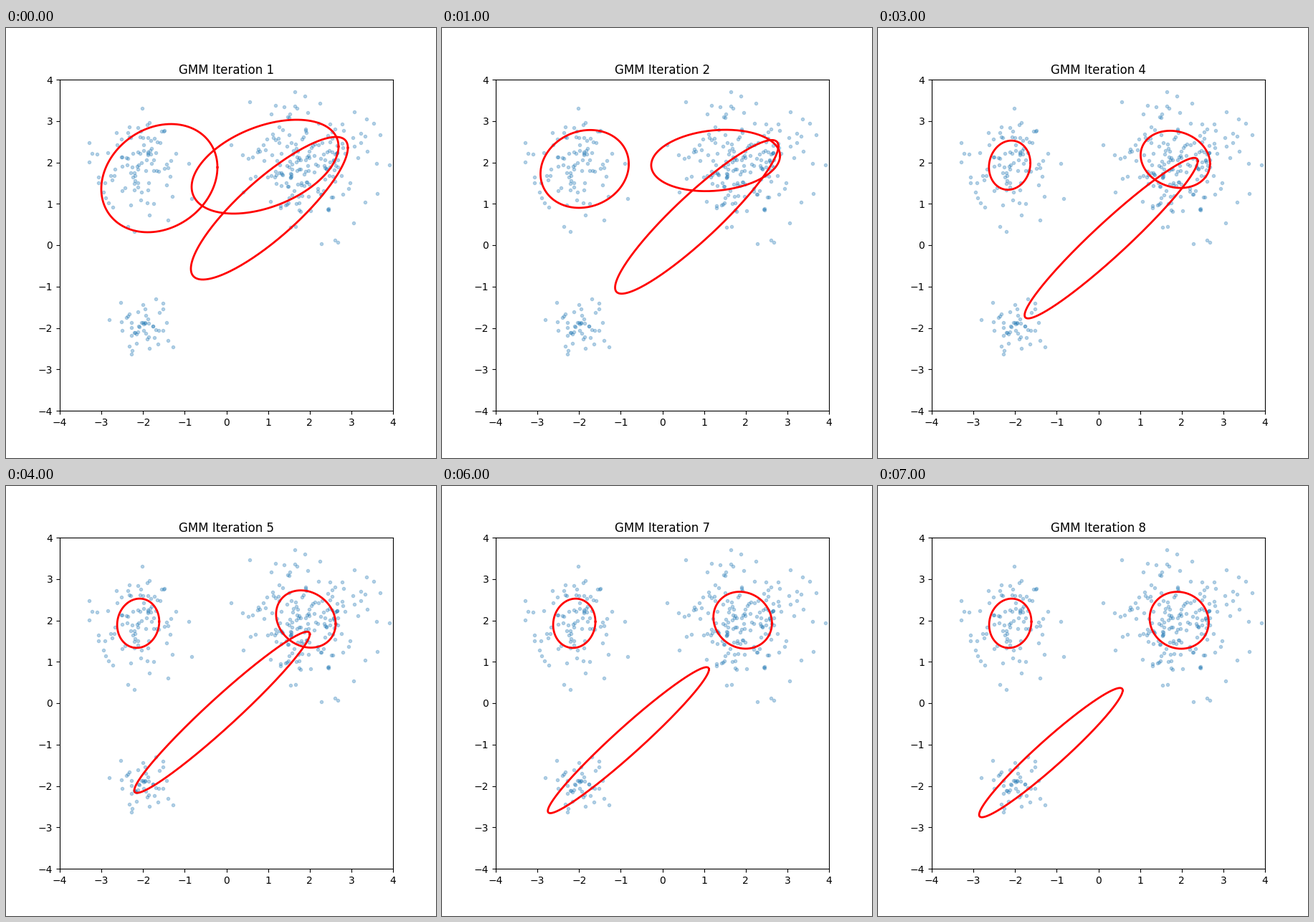
Animation, 600 px wide and 600 px high, one loop 8000 ms. Source, as a matplotlib script:

```python
import numpy as np
import matplotlib.pyplot as plt
from matplotlib.animation import FuncAnimation

STEPS = 8
LIMIT = 4

# Mixture after the first iteration: mean x, mean y, std x, std y, correlation.
START = [
    (-1.609, 1.619, 1.394, 1.307, 0.200),
    (0.929, 1.896, 1.763, 1.134, 0.430),
    (1.032, 0.892, 1.884, 1.723, 0.848),
]


def cluster(rng, mean, var, count):
    return np.array(mean) + np.sqrt(var) * rng.randn(count, 2)


def gaussian(mx, my, sx, sy, rho):
    cxy = rho * sx * sy
    return np.array([mx, my]), np.array([[sx ** 2, cxy], [cxy, sy ** 2]])


def moments(mean, cov):
    """Total mass, mean and scaled second moments as one vector."""
    second = (cov + np.outer(mean, mean)) / LIMIT
    return np.array([1, *mean, second[0, 0], second[0, 1], second[1, 1]])


def match_weights(data, parts):
    """Weights with which the mixture has the moments of the data."""
    columns = np.column_stack([moments(*part) for part in parts])
    total = moments(data.mean(axis=0), np.cov(data.T, bias=True))
    weights = np.linalg.lstsq(columns, total, rcond=None)[0]
    return weights / weights.sum()


def density(data, mean, cov):
    d = data - mean
    power = np.einsum("ni,ij,nj->n", d, np.linalg.inv(cov), d)
    return np.exp(-power / 2) / np.sqrt(np.linalg.det(cov))


def em_step(data, weights, parts):
    """One expectation-maximisation update of all components."""
    resp = np.array([w * density(data, *p) for w, p in zip(weights, parts)])
    resp /= resp.sum(axis=0)
    updated = []
    for r in resp:
        mean = r @ data / r.sum()
        d = data - mean
        updated.append((mean, (r[:, None] * d).T @ d / r.sum()))
    return resp.mean(axis=1), updated


def outline(mean, cov):
    """Ellipse at one standard deviation."""
    t = np.linspace(0, 2 * np.pi, 241)
    circle = np.array([np.cos(t), np.sin(t)])
    return mean[:, None] + np.linalg.cholesky(cov) @ circle


rng = np.random.RandomState(0)
points = np.vstack([
    cluster(rng, (-2, -2), 0.1, 50),
    cluster(rng, (2, 2), 0.5, 200),
    cluster(rng, (-2, 2), 0.3, 100),
])

parts = [gaussian(*row) for row in START]
weights = match_weights(points, parts)
history = [parts]
while len(history) < STEPS:
    weights, parts = em_step(points, weights, parts)
    history.append(parts)

fig, ax = plt.subplots(figsize=(6, 6), dpi=100)
ax.set_xlim(-LIMIT, LIMIT)
ax.set_ylim(-LIMIT, LIMIT)
ax.plot(*points.T, "o", color="C0", markersize=3, alpha=0.3)
title = ax.set_title("")
lines = [ax.plot([], [], color="red", lw=2, zorder=3)[0] for _ in START]


def draw(step):
    title.set_text(f"GMM Iteration {step + 1}")
    for line, part in zip(lines, history[step]):
        line.set_data(*outline(*part))
    return [title, *lines]


anim = FuncAnimation(fig, draw, frames=STEPS, interval=1000, repeat=True,
                     repeat_delay=0, blit=False)
plt.show()
```
